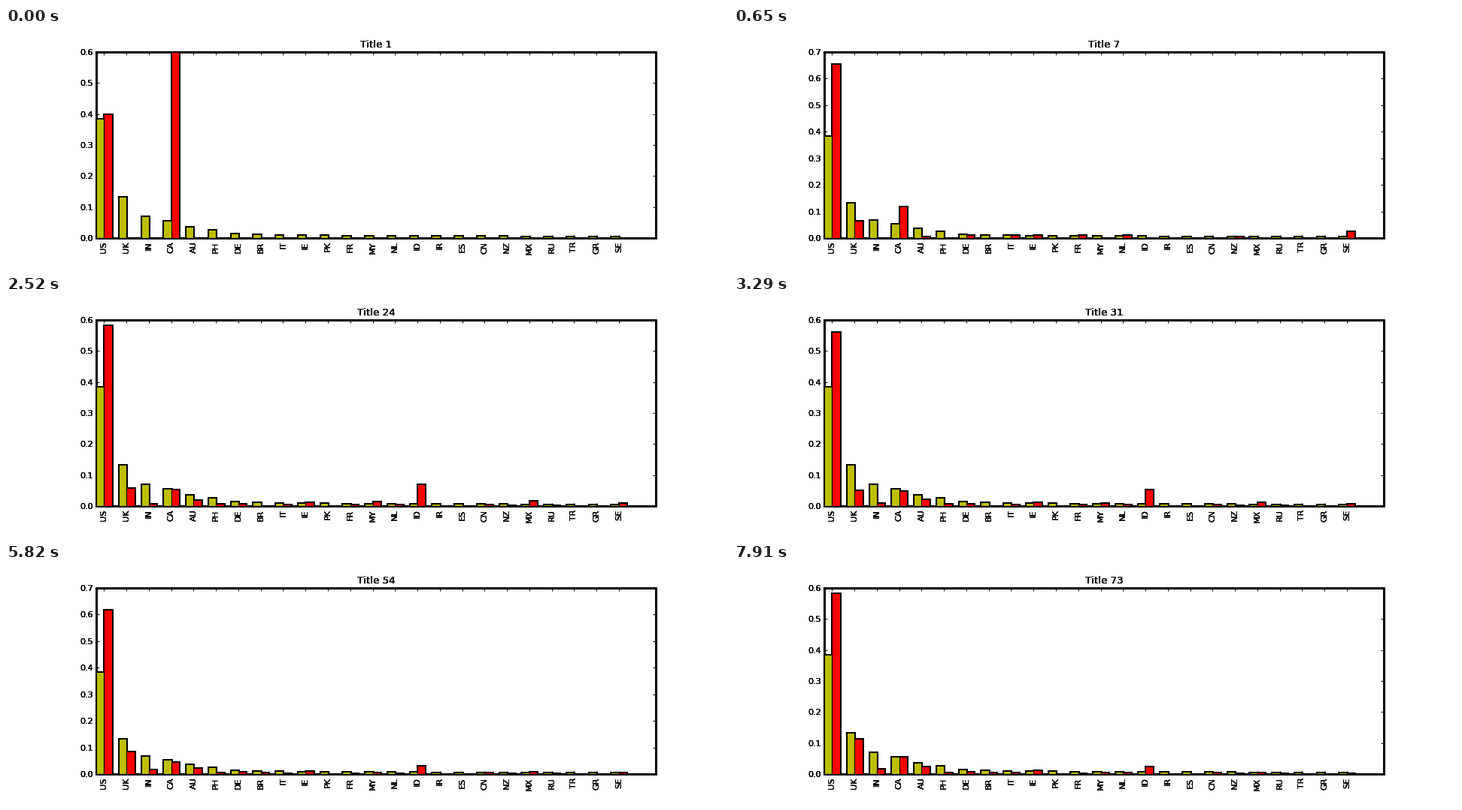
A matplotlib script for the animation above (8 s loop, 960x320 px).

```python
import numpy as np
import matplotlib.pyplot as plt
from matplotlib.animation import FuncAnimation
from matplotlib.patches import PathPatch, Rectangle
from matplotlib.path import Path

plt.rcParams["font.family"] = "DejaVu Sans"
plt.rcParams["text.kerning_factor"] = 6
WIDTH, HEIGHT, DPI = 960, 320, 80
LOOP_MS, INTERVAL = 8000, 40
LEFT, RIGHT, BOTTOM, TOP = 120, 864, 40, 288
BAR, PAD = 0.35, 4 * DPI / 72

CODES = ("US UK IN CA AU PH DE BR IT IE PK FR MY NL ID IR ES CN NZ "
         "MX RU TR GR SE").split()
HEAD = [0.3835, 0.1335, 0.069, 0.0545, 0.0365, 0.0265, 0.0155, 0.011]
TAIL = 0.0054 + 0.0053 * np.exp(-np.arange(len(CODES) - len(HEAD)) / 5.2)
BASE = np.concatenate([HEAD, TAIL])

# The leading shares wander between a few (step, share) points.
PATHS = {
    "US": [(1, .4), (7, .655), (13, .71), (16, .757), (22, .59), (31, .562),
           (43, .555), (54, .617), (65, .604), (73, .583)],
    "UK": [(1, 0), (7, .065), (16, .065), (31, .051), (43, .104), (54, .085),
           (73, .114)],
    "CA": [(1, .6), (2, .42), (7, .1185), (16, .058), (43, .04), (73, .056)],
}
# The others are running means: (first step, early burst, steady level).
MEANS = {
    "IN": (7, -.43, .024), "AU": (3, -.13, .025), "PH": (24, .15, .002),
    "DE": (4, .035, .0065), "BR": (45, 0, .005), "IT": (4, .06, .003),
    "IE": (4, 0, .012), "FR": (4, .075, .0015), "MY": (24, .32, 0),
    "NL": (4, .06, .003), "ID": (24, 1.68, 0), "CN": (10, -.03, .005),
    "NZ": (4, .03, .002), "MX": (24, .39, 0), "RU": (10, 0, .003),
    "SE": (4, .18, .001),
}
MISSING = {8, 12, 15, 23, 29, 44, 57}

fig = plt.figure(figsize=(WIDTH / DPI, HEIGHT / DPI), dpi=DPI, facecolor="white")
ax = fig.add_axes([LEFT / WIDTH, BOTTOM / HEIGHT,
                   (RIGHT - LEFT) / WIDTH, (TOP - BOTTOM) / HEIGHT])
ax.set_xlim(0, 25)
ax.set_xticks(np.arange(len(CODES)) + BAR)
ax.tick_params(direction="in", length=4, width=0.9, top=True, right=True,
               labelbottom=False, labelleft=False)
for spine in ax.spines.values():
    spine.set_linewidth(1)
ax.add_patch(Rectangle((0, 0), 1, 1, transform=ax.transAxes, fill=False,
                       lw=2.7, zorder=0.5, clip_on=False))


def heavy_text(x, y, text="", **style):
    """Stack copies of a label to darken its soft edges."""
    return [fig.text(x / WIDTH, y / HEIGHT, text, **style) for _ in range(5)]


def bars_path(offset, heights):
    left = np.arange(len(heights)) + offset
    right, zero = left + BAR, np.zeros(len(heights))
    xs = np.stack([left, left, right, right, left], axis=1)
    ys = np.stack([zero, heights, heights, zero, zero], axis=1)
    codes = [Path.MOVETO] + [Path.LINETO] * 3 + [Path.CLOSEPOLY]
    return Path(np.stack([xs, ys], axis=2).reshape(-1, 2), codes * len(heights))


def add_bars(offset, heights, color, zorder):
    """Draw bars over a wider outline that lies behind every fill."""
    path = bars_path(offset, heights)
    outline = PathPatch(path, fill=False, lw=2.7, zorder=1, snap=True)
    body = PathPatch(path, facecolor=color, edgecolor="black", lw=1,
                     zorder=zorder, snap=True)
    return [ax.add_patch(outline), ax.add_patch(body)]


def share(code, step):
    if code in PATHS:
        return np.interp(step, *zip(*PATHS[code]))
    first, burst, steady = MEANS.get(code, (0, 0, 0))
    return max(0, steady + burst / step) if step >= first else 0


def shares_at(step):
    return np.array([share(code, step) for code in CODES])


def step_at(ms):
    step = 1 if ms < 100 else (ms - 100) // 110 + 2
    return step - 1 if step in MISSING else step


add_bars(0, BASE, (0.75, 0.75, 0), 2)
red_bars = add_bars(BAR, shares_at(1), "red", 2.2)
for i, code in enumerate(CODES):
    x = LEFT + (i + BAR) * (RIGHT - LEFT) / 25
    heavy_text(x, BOTTOM - PAD, code, fontsize=10, rotation=90,
               ha="center", va="top")
y_labels = [heavy_text(LEFT - PAD, BOTTOM, fontsize=10, ha="right",
                       va="center_baseline") for _ in range(10)]
title = heavy_text((LEFT + RIGHT) / 2, TOP + 5.55, fontsize=12,
                   ha="center", va="baseline")


def set_scale(peak):
    spacing = 0.05 if peak <= 0.45 else 0.1
    count = int(np.ceil(peak / spacing - 1e-6))
    ax.set_ylim(0, count * spacing)
    ax.set_yticks(np.arange(count + 1) * spacing)
    digits = 2 if spacing < 0.1 else 1
    for i, copies in enumerate(y_labels):
        for label in copies:
            label.set_visible(i <= count)
            label.set_y((BOTTOM + (TOP - BOTTOM) * i / count) / HEIGHT)
            label.set_text(f"{i * spacing:.{digits}f}")


def update(frame):
    step = step_at(frame * INTERVAL + 30)
    shares = shares_at(step)
    path = bars_path(BAR, shares)
    for patch in red_bars:
        patch.set_path(path)
    set_scale(max(shares.max(), BASE.max()))
    for label in title:
        label.set_text(f"Title {step}")
    return red_bars


anim = FuncAnimation(fig, update, frames=LOOP_MS // INTERVAL, interval=INTERVAL,
                     init_func=lambda: update(0), repeat=True, repeat_delay=0)
plt.show()
```
